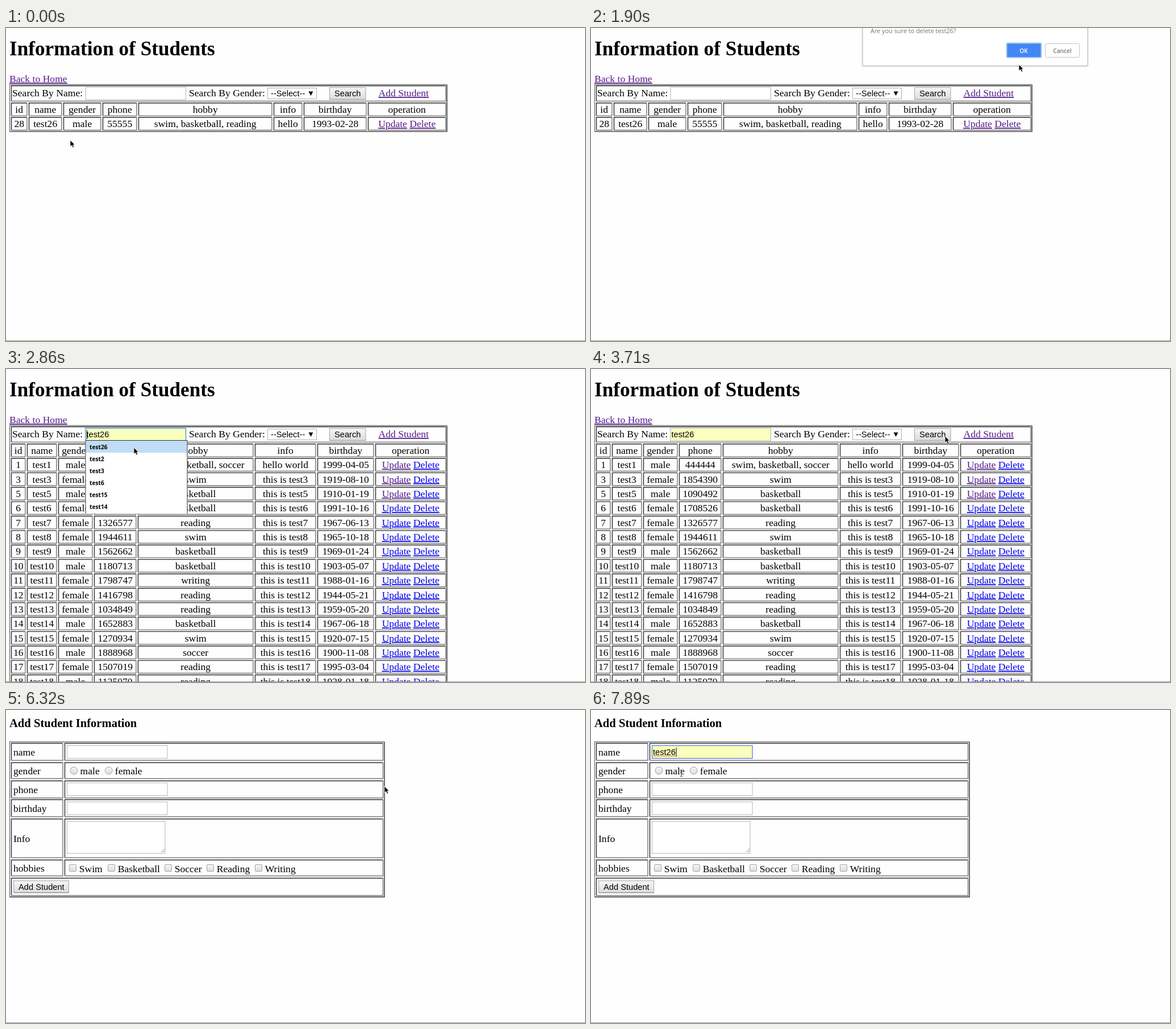
Write an HTML page that moves like this. It is 1019x550 px and loops after 8 s.

```html
<!DOCTYPE html>
<html lang="en">
<head>
<meta charset="utf-8">
<title>Student information</title>
<style>
  html, body { margin: 0; width: 100%; height: 100%; overflow: hidden; background: #fefefe; }
  svg { display: block; width: 100%; height: 100%; }
  text { font: 17.6px "Liberation Serif", "Times New Roman", serif; white-space: pre; }
  .mid { text-anchor: middle; }
  .h1 { font-size: 35.2px; font-weight: bold; }
  .h3 { font-size: 20.6px; font-weight: bold; }
  .ui { font: 14.67px "Liberation Sans", Arial, sans-serif; }
  .item { font: bold 10.2px "Open Sans", sans-serif; }
  .dialog { font: 10.9px "Open Sans", sans-serif; fill: #757575; }
  .label { font: 600 10.2px "Open Sans", sans-serif; fill: #757575; text-anchor: middle; }
  .new { fill: #0000ee; text-decoration: underline; }
  .seen { fill: #551a8b; text-decoration: underline; }
</style>
</head>
<body>
<svg id="stage" viewBox="0 0 1019 550" xmlns="http://www.w3.org/2000/svg"></svg>
<script>
const LOOP = 8000;
const stage = document.getElementById('stage');

// Bursts of screen updates: start, end, count
const bursts = [[120, 1120, 8], [1240, 2170, 8], [2320, 2860, 5], [3140, 4130, 8],
  [4250, 4790, 5], [5190, 5730, 5], [6320, 7350, 8], [7470, 7890, 4]];
const steps = [0];
for (const [from, to, count] of bursts)
  for (let k = 0; k < count; k++)
    steps.push(Math.floor((from + (to - from) * k / (count - 1)) / 10) * 10);

// Pointer path: time, x, y, shape
const path = [
  [0, 113, 197, 'arrow'], [830, 733, 170, 'hand'], [970, 734, 168, 'arrow'],
  [1240, 737, 150, 'arrow'], [1630, 758, 42, 'arrow'], [1770, 758, 44, 'arrow'],
  [1900, 753, 64, 'arrow'], [2030, 540, 110, 'arrow'], [2170, 340, 138, 'arrow'],
  [2320, 262, 118, 'beam'], [2590, 226, 117, 'beam'], [2720, 225, 132, 'arrow'],
  [2860, 225, 138, 'arrow'], [3140, 226, 137, 'arrow'], [3560, 612, 117, 'arrow'],
  [3700, 623, 118, 'arrow'], [3840, 622, 118, 'arrow'], [3980, 430, 121, 'arrow'],
  [4130, 290, 119, 'beam'], [4380, 205, 116, 'beam'], [4520, 199, 116, 'beam'],
  [5190, 212, 100, 'arrow'], [5320, 330, 84, 'arrow'], [5590, 640, 100, 'arrow'],
  [5730, 717, 111, 'hand'], [6320, 666, 134, 'arrow'], [7050, 225, 76, 'beam'],
  [7200, 180, 75, 'beam'], [7470, 165, 80, 'beam'], [7610, 160, 97, 'arrow'],
  [7750, 159, 105, 'arrow'], [7890, 159, 111, 'beam']
];

const headings = ['id', 'name', 'gender', 'phone', 'hobby', 'info', 'birthday', 'operation'];
const columns = {
  single: [9, 40, 101, 170, 233, 471, 524, 637, 777],
  list: [9, 37, 92, 155, 232, 438, 548, 650, 777],
  empty: [9, 47, 134, 240, 337, 436, 503, 632, 777]
};
const people = `1 m swim,_basketball,_soccer 1999-04-05
3 f swim 1919-08-10
5 m basketball 1910-01-19
6 f basketball 1991-10-16
7 f reading 1967-06-13
8 f swim 1965-10-18
9 m basketball 1969-01-24
10 m basketball 1903-05-07
11 f writing 1988-01-16
12 f reading 1944-05-21
13 f reading 1959-05-20
14 m basketball 1967-06-18
15 f swim 1920-07-15
16 m soccer 1900-11-08
17 f reading 1995-03-04
18 m reading 1928-01-18`.split('\n').map((line, i) => {
  const [id, sex, hobby, born] = line.split(' ');
  const phone = i ? 1000000 + (id * 618034 + 271) % 999983 : 444444;
  return [id, 'test' + id, sex === 'm' ? 'male' : 'female', phone, hobby.replace(/_/g, ' '),
    i ? 'this is test' + id : 'hello world', born, actions(i < 3 ? 'seen' : 'new', 'new')];
});
const single = ['28', 'test26', 'male', '55555', 'swim, basketball, reading', 'hello',
  '1993-02-28', actions('seen', 'seen')];

function actions(update, remove) {
  return `<tspan class="${update}">Update</tspan> <tspan class="${remove}">Delete</tspan>`;
}
function text(x, y, content, cls = '') {
  return `<text x="${x}" y="${y}" class="${cls}">${content}</text>`;
}
function rect(x, y, w, h, fill, stroke = 'none', extra = '') {
  return `<rect x="${x}" y="${y}" width="${w}" height="${h}" fill="${fill}" stroke="${stroke}" ${extra}/>`;
}
function line(d, stroke, width = 1) {
  return `<path d="${d}" fill="none" stroke="${stroke}" stroke-width="${width}"/>`;
}
function bevel(x1, y1, x2, y2, light, dark) {
  const [l, t, r, b] = [x1 + .5, y1 + .5, x2 - .5, y2 - .5];
  return line(`M${l} ${b}V${t}H${r}`, light, 1.4) + line(`M${r} ${t}V${b}H${l}`, dark, 1.4);
}
const frame = (x1, y1, x2, y2) => bevel(x1, y1, x2, y2, '#777', '#2c2c2c');
const cell = (x1, y1, x2, y2) => bevel(x1, y1, x2, y2, '#2c2c2c', '#777');

function button(x, y, w, label) {
  return rect(x + .5, y + .5, w - 1, 21, 'url(#face)', '#a6a6a6') +
    line(`M${x} ${y + 21.5}H${x + w}`, '#8a8a8a') + text(x + 9, y + 16, label, 'ui');
}
function input(x, y, h, { focus, filled, caret } = {}) {
  let out = rect(x + .5, y + .5, 176.5, h - 1, filled ? '#faffbd' : '#fff', focus ? '#5b93e6' : '#b4b4b4',
    focus ? 'stroke-width="1.5"' : '');
  if (filled) out += text(x + 2, y + 16.5, 'test26', 'ui');
  if (caret != null) out += line(`M${x + caret + .5} ${y + 4}V${y + 20}`, '#000');
  return out;
}
function suggestions(x, y, picked) {
  const names = ['test26', 'test2', 'test3', 'test6', 'test15', 'test14'];
  return rect(x, y, 180, 129, '#fff') + (picked ? rect(x + 1, y + 1, 178, 21, '#bfddf5') : '') +
    line(`M${x + .5} ${y + 129}V${y + .5}H${x + 179.5}V${y + 129}`, '#333') +
    names.map((name, i) => text(x + 7.5, y + 15.5 + i * 21.15, name, 'item')).join('');
}

function tableRow(xs, top, values) {
  return values.map((value, i) => cell(xs[i], top, xs[i + 1] - 2.6, top + 23.4) +
    text((xs[i] + xs[i + 1] - 2.6) / 2, top + 17.7, value, 'mid')).join('');
}
function studentPage(kind, field) {
  const rows = { single: [single], list: people, empty: [] }[kind];
  const bottom = 157 + rows.length * 25.36;
  return text(6, 48, 'Information of Students', 'h1') + text(6, 95, 'Back to Home', 'seen') +
    frame(6, 99, 776.5, bottom) + cell(9, 101, 774.4, 129) +
    text(11, 120, 'Search By Name:') + input(139.5, 103.5, 23, field) +
    text(322, 120, 'Search By Gender:') + rect(460.5, 105.5, 86, 19, '#fff', '#b0b0b0') +
    text(466, 120, '--Select--', 'ui') + '<path d="M532.5 111.5h8l-4 7.5z"/>' +
    button(569, 104, 64.5, 'Search') + text(655.5, 120, 'Add Student', 'seen') +
    [headings, ...rows].map((row, i) => tableRow(columns[kind], 131.2 + i * 25.36, row)).join('');
}

function formPage(field) {
  const labels = [['name', 58, 89], ['gender', 92, 121], ['phone', 124, 155], ['birthday', 157, 188],
    ['Info', 191, 260], ['hobbies', 263, 292]];
  const hobbies = [['Swim', 111], ['Basketball', 179], ['Soccer', 279], ['Reading', 353], ['Writing', 438]];
  const radio = (x, label) => `<circle cx="${x}" cy="106.5" r="6.4" fill="url(#face)" stroke="#a0a0a0"/>` +
    text(x + 11, 113, label);
  return text(6, 30, 'Add Student Information', 'h3') + frame(6, 55.5, 666.5, 329) +
    labels.map(([label, top, bottom]) => cell(9, top, 100.5, bottom) + cell(103, top, 664, bottom) +
      text(13, (top + bottom) / 2 + 6.3, label)).join('') +
    cell(9, 295, 664, 326.5) + input(107, 62, 23.5, field) + input(107, 127.5, 23.5) + input(107, 161, 23.5) +
    radio(119.5, 'male') + radio(180.8, 'female') +
    rect(107.5, 195.5, 172.5, 56.5, '#fff', '#b4b4b4') + line('M273 250l6-6M276.5 250l2.5-2.5', '#888') +
    hobbies.map(([label, x]) => rect(x + .5, 271.5, 12, 12, 'url(#face)', '#a6a6a6', 'rx="1.5"') +
      text(x + 17.7, 285, label)).join('') +
    button(13, 299.5, 98, 'Add Student');
}

function confirmBox() {
  return rect(476.5, -10, 399, 78.5, '#000', 'none', 'rx="3" opacity=".1"') +
    rect(478, -10, 396, 76.5, '#fff', '#b8b8b8', 'rx="2"') +
    text(492, 9, 'Are you sure to delete test26?', 'dialog') +
    rect(731.5, 26.5, 61, 25.5, '#4387f5', '#a9c9fb', 'stroke-width="2" rx="2"') +
    text(761.5, 43.5, 'OK', 'label" style="fill:#fff') +
    rect(799.5, 27.5, 60, 24, '#fff', '#c4c4c4', 'rx="2"') + text(829.5, 43.5, 'Cancel', 'label');
}

const pointers = {
  arrow: '<path d="M0 0V11.5L2.7 9L4.8 13.2L6.8 12.3L4.9 8.2H8.2Z" stroke="#fff" stroke-width=".8"/>',
  hand: '<path d="M0 1q1.4-2 2.8 0V6q4-1 7.5 1.5V12L8.5 16H1.5L-3 9.5q1-1.8 3 0Z" fill="#fff" stroke="#000"/>',
  beam: '<path d="M-2.5 -5.5H-.7L0 -5L.7 -5.5H2.5M0 -5V5M-2.5 5.5H-.7L0 5L.7 5.5H2.5" fill="none" stroke="#444"/>'
};
function pointer(t) {
  let i = path.length - 1;
  while (path[i][0] > t) i--;
  const [t0, x0, y0, shape] = path[i];
  const [t1, x1, y1] = path[i + 1] || [LOOP, x0, y0];
  const p = (t - t0) / (t1 - t0);
  return `<g transform="translate(${x0 + (x1 - x0) * p} ${y0 + (y1 - y0) * p})">${pointers[shape]}</g>`;
}

function scene(t) {
  const during = (from, to) => t >= from && t < to;
  if (t >= 6320) {
    const filled = t >= 7610, focus = t >= 7200;
    const caret = !focus ? null : t >= 7890 ? 42.5 : 2;
    let out = formPage({ focus, filled, caret });
    if (during(7350, 7890)) out += suggestions(106.5, 86, filled);
    if (t >= 7890) out += line('M109 81.5' + 'l2-1.5l2 1.5'.repeat(10), '#e33', .9);
    return out;
  }
  const kind = t < 2030 ? 'single' : t < 3840 ? 'list' : 'empty';
  const focus = during(2450, 3700) || during(4380, 5190);
  const filled = during(2720, 3840);
  const caret = !focus ? null : during(3140, 3700) ? 42.5 : 2.5;
  let out = studentPage(kind, { focus, filled, caret });
  if (during(970, 2030)) out += confirmBox();
  if (during(2590, 3140) || during(4520, 5190)) out += suggestions(139.5, 125, filled);
  return out;
}

const defs = `<defs><linearGradient id="face" x2="0" y2="1"><stop stop-color="#f6f6f6"/>
  <stop offset="1" stop-color="#dcdcdc"/></linearGradient></defs>`;
let shown = -1;
function render(now) {
  const t = now % LOOP;
  const step = steps.filter(s => s <= t).pop();
  if (step !== shown) {
    shown = step;
    stage.innerHTML = defs + rect(0, 0, 1019, 550, '#fefefe') + scene(step) +
      rect(0, 549, 1019, 1, '#9a9a9a') + pointer(step);
  }
}
const start = performance.now();
function tick() {
  render(performance.now() - start);
  requestAnimationFrame(tick);
}
tick();
</script>
</body>
</html>
```
